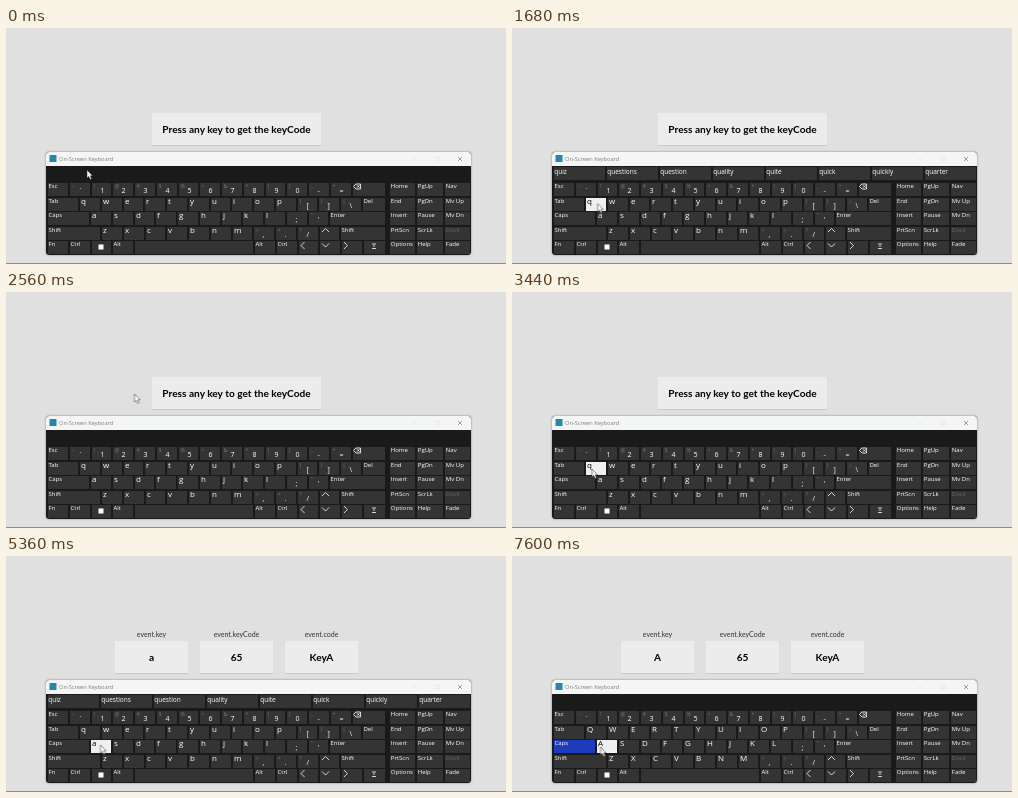
Recreate the animation shown at these times as an HTML page. Size 500 by 236 pixels, loop 8000 ms.

```html
<!DOCTYPE html>
<html lang="en">
<head>
<meta charset="utf-8">
<title>Key codes</title>
<style>
  html, body { margin: 0; width: 100%; height: 100%; overflow: hidden; background: #e0e0e0; }
  svg { display: block; width: 100%; height: 100%; }
  text { font-family: "Open Sans", "Noto Sans", sans-serif; white-space: pre; }

  .box { fill: #ececec; filter: drop-shadow(.5px .7px .4px #0008); }
  .value, .name { font-family: Lato, sans-serif; text-anchor: middle; }
  .value { font-size: 10.15px; font-weight: 700; fill: #000; }
  .name { font-size: 7px; fill: #333; }

  .window { filter: drop-shadow(0 .5px 1.2px #0006); }
  .title { font-size: 5.7px; fill: #7d7d7d; }
  .key { fill: #343434; color: #fff; }
  .key text { fill: currentColor; }
  .key path { fill: none; stroke: currentColor; stroke-width: .8; }
  .label { font-size: 6px; font-weight: 500; }
  .word { font-size: 6.5px; font-weight: 500; }
  .letter { font-size: 8px; }
  .digit { font-size: 7px; }
  .key .dim { fill: #747474; font-size: 5.5px; }
  .key .off { fill: #6a6a6a; }

  /* One percent of the loop is 80 ms. */
  .prompt, .cards, .words, .lower, .upper, .step,
  .key-q, .key-a, .key-Caps { animation: 8s step-end infinite; }
  .prompt { animation-name: prompt; }
  .cards { animation-name: cards; }
  .words { animation-name: words; }
  .lower { animation-name: lower; }
  .upper { animation-name: upper; }
  .step0 { animation-name: step0; }
  .step1 { animation-name: step1; }
  .step2 { animation-name: step2; }
  .step3 { animation-name: step3; }
  .key-q { animation-name: hover-q; }
  .key-a { animation-name: hover-a; }
  .key-Caps { animation-name: caps; }
  .pointer { animation: move 8s linear infinite; }

  @keyframes prompt { 0% { opacity: 1 } 44%, to { opacity: 0 } }
  @keyframes cards { 0% { opacity: 0 } 44%, to { opacity: 1 } }
  @keyframes words { 0%, 28%, 68%, to { opacity: 0 } 8%, 44% { opacity: 1 } }
  @keyframes lower { 0% { opacity: 1 } 81%, to { opacity: 0 } }
  @keyframes upper { 0% { opacity: 0 } 81%, to { opacity: 1 } }
  @keyframes step0 { 0%, 67%, to { opacity: 0 } 44% { opacity: 1 } }
  @keyframes step1 { 0%, 80%, to { opacity: 0 } 67% { opacity: 1 } }
  @keyframes step2 { 0%, 91%, to { opacity: 0 } 80% { opacity: 1 } }
  @keyframes step3 { 0% { opacity: 0 } 91%, to { opacity: 1 } }
  @keyframes hover-q {
    0%, 22%, 55%, to { fill: #343434; color: #fff }
    5%, 39% { fill: #efefef; color: #000 }
  }
  @keyframes hover-a {
    0%, 76% { fill: #343434; color: #fff }
    58%, 87%, to { fill: #efefef; color: #000 }
  }
  @keyframes caps {
    0% { fill: #343434; color: #fff }
    76% { fill: #efefef; color: #000 }
    81%, to { fill: #1f3bbd; color: #fff }
  }
  @keyframes move {
    0%, 1% { transform: translate(81px, 142px) }
    6% { transform: translate(85px, 174px) }
    8%, 21% { transform: translate(85.5px, 175.7px) }
    22% { transform: translate(92px, 160px) }
    28%, 34% { transform: translate(128.5px, 102px) }
    40% { transform: translate(84px, 179px) }
    43%, 51% { transform: translate(80px, 177px) }
    55% { transform: translate(80px, 182px) }
    61%, 74% { transform: translate(94.5px, 189px) }
    78%, 85% { transform: translate(62.5px, 190px) }
    88%, 93% { transform: translate(90px, 191.5px) }
    95%, to { transform: translate(88.5px, 191px) }
  }
</style>
</head>
<body>
<svg id="stage" viewBox="0 0 500 236">
  <rect width="500" height="236" fill="#e0e0e0"/>
  <rect y="235" width="500" height="1" fill="#8c8c8c"/>
  <g class="prompt">
    <rect class="box" x="146" y="85" width="169" height="32.5"/>
    <text class="value" x="230.5" y="105.3">Press any key to get the keyCode</text>
  </g>
  <g class="cards" id="cards"></g>
  <g class="window">
    <rect x="40" y="124" width="425" height="103" rx="3.5" fill="#1a1a1a"/>
    <path d="M40 138V127.5q0-3.5 3.5-3.5h418q3.5 0 3.5 3.5V138z" fill="#f4f5f5"/>
  </g>
  <rect x="43.5" y="127" width="7" height="7" fill="#2487ab"/>
  <text class="title" x="53" y="133">On-Screen Keyboard</text>
  <path d="M406 131h4M429 129h4v4h-4z" fill="none" stroke="#e2e4e4" stroke-width=".7"/>
  <path d="M452 129l4 4m0-4l-4 4" stroke="#777" stroke-width=".7"/>
  <g class="words" id="words"></g>
  <g id="keys"></g>
  <path class="pointer" d="M0 0V8L1.8 6.4 3.2 9.4 4.6 8.7 3.3 5.8H5.6z" fill="#fff" stroke="#222" stroke-width=".5"/>
</svg>
<script>
  const byId = id => document.getElementById(id);

  function add(parent, tag, attrs, content) {
    const node = document.createElementNS("http://www.w3.org/2000/svg", tag);
    for (const name in attrs) node.setAttribute(name, attrs[name]);
    if (content) node.textContent = content;
    return parent.appendChild(node);
  }

  const write = (parent, kind, x, y, content) =>
    add(parent, "text", { class: kind, x, y }, content);

  // Event cards
  const steps = [["q", "81", "KeyQ"], ["a", "65", "KeyA"],
                 ["CapsLock", "20", "CapsLock"], ["A", "65", "KeyA"]];
  ["event.key", "event.keyCode", "event.code"].forEach((name, i) => {
    const left = 109 + 85 * i, middle = left + 36.5;
    add(byId("cards"), "rect", { class: "box", x: left, y: 85, width: 73, height: 32.5 });
    write(byId("cards"), "name", middle, 80.5, name);
    steps.forEach((values, n) =>
      write(byId("cards"), `value step step${n}`, middle, 105.3, values[i]));
  });

  // Keyboard
  const icons = {
    back: "M1.5 4.5l2.5-2.5h4.5v5H4zM5 3.2l2.5 2.5m0-2.5l-2.5 2.5",
    up: "M3 6l3.5-3.5L10 6",
    down: "M3 3.5l3.5 3.5L10 3.5",
    left: "M6.5 2L3 5.5 6.5 9",
    right: "M3 2l3.5 3.5L3 9",
    dock: "M9 4h4M10 6h2M9 8.5h4"
  };
  const rowTop = row => Math.round(154 + 14.6 * row);

  function keyBox(parent, x, y, right, name) {
    const key = add(parent, "g", { class: "key key-" + name });
    add(key, "rect", { x: x + 1, y: y + 1, width: right - x - 2, height: 13 });
    return key;
  }

  function drawKey(token, x, right, row) {
    const y = rowTop(row);
    const key = keyBox(byId("keys"), x, y, right, /^\w+$/.test(token) ? token : "sign");
    if (token === "space") return;
    if (token === "win") {
      add(key, "rect", { x: x + 7.5, y: y + 4.5, width: 5, height: 5, style: "fill:currentColor" });
    } else if (icons[token]) {
      add(key, "path", { d: icons[token], transform: `translate(${x} ${y})` });
    } else if (/^[a-z]$/.test(token)) {
      write(key, "letter lower", x + 2, y + 7, token);
      write(key, "letter upper", x + 2, y + 7, token.toUpperCase());
    } else if (/^[^a-zA-Z]{2}$/.test(token)) {
      write(key, "dim", x + 2.5, y + 6, token[0]);
      write(key, "digit", x + 9.5, y + 11, token[1]);
    } else {
      write(key, "label", x + 1.5, y + 6.4, token);
    }
  }

  const rows = [
    [21.75, "Esc ~` !1 @2 #3 $4 %5 ^6 &7 *8 (9 )0 _- += back"],
    [32, "Tab q w e r t y u i o p {[ }] |\\ Del"],
    [43, "Caps a s d f g h j k l :; \"' Enter"],
    [54, "Shift z x c v b n m <, >. ?/ up Shift"],
    [21.75, "Fn Ctrl win Alt space Alt Ctrl left down right dock"]
  ];
  rows.forEach(([firstWidth, line], row) => {
    let x = 41;
    line.split(" ").forEach((token, i, all) => {
      const width = i === 0 ? firstWidth : token === "space" ? 120 : 21.75;
      const right = i === all.length - 1 ? 380 : x + width;
      drawKey(token, Math.round(x), Math.round(right), row);
      x = right;
    });
  });

  const side = ["Home,PgUp,Nav", "End,PgDn,Mv Up", "Insert,Pause,Mv Dn",
                "PrtScn,ScrLk,Dock", "Options,Help,Fade"];
  side.forEach((line, row) => line.split(",").forEach((name, i) => {
    const x = [383, 410, 438][i], y = rowTop(row);
    const key = keyBox(byId("keys"), x, y, [410, 438, 465][i], "side");
    write(key, name === "Dock" ? "label off" : "label", x + 1.8, y + 6.4, name);
  }));

  "quiz questions question quality quite quick quickly quarter".split(" ").forEach((word, i) => {
    const x = 41 + 53 * i;
    const cell = keyBox(byId("words"), x, 138, x + 53, "cell");
    write(cell, "word", x + 1.2, 146, word);
  });
</script>
</body>
</html>
```
